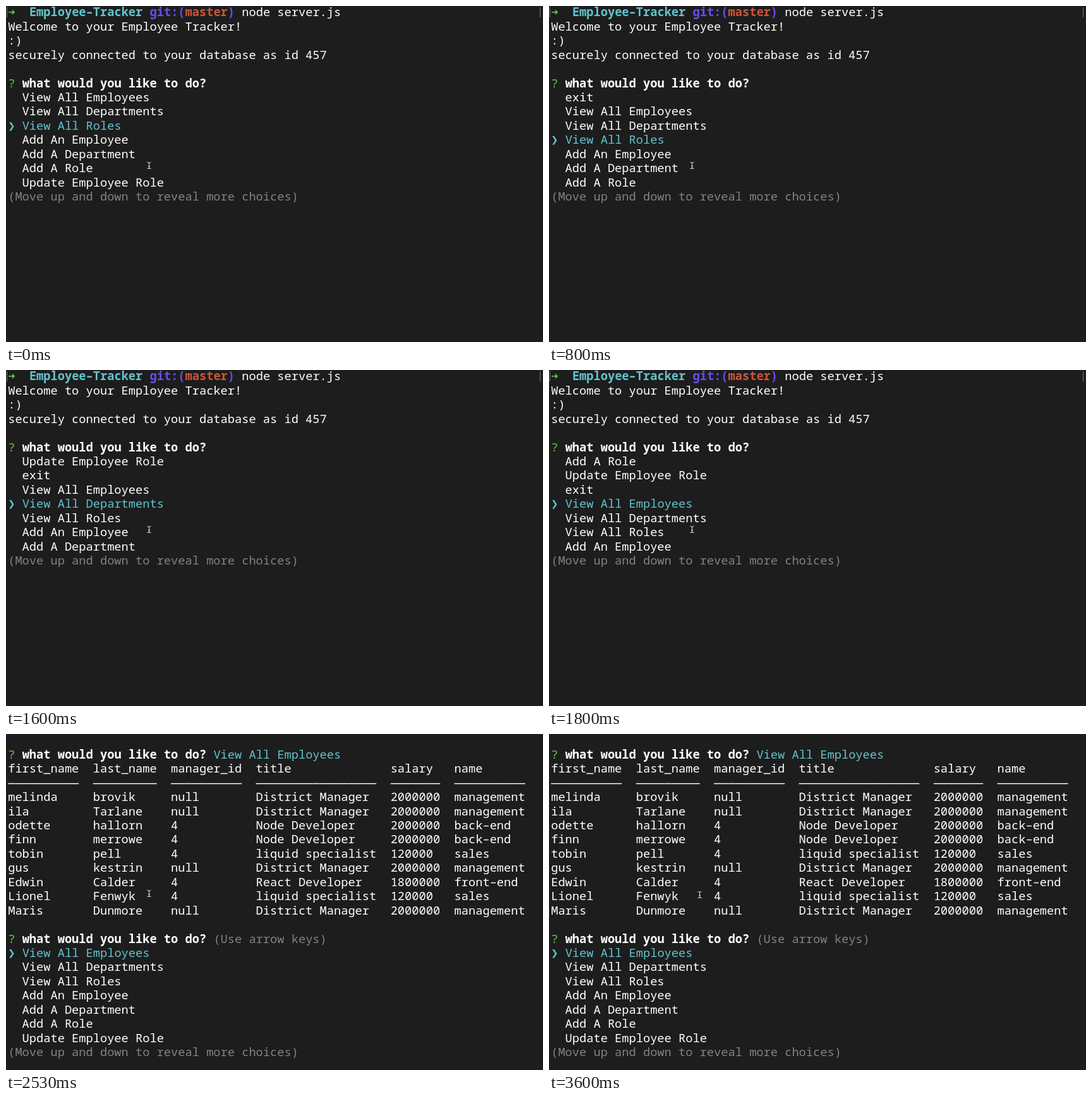
Animation of 850x532 px, one loop 3.66 s. Source, as an HTML page:

```html
<!DOCTYPE html>
<html lang="en">
<head>
<meta charset="utf-8">
<title>Employee Tracker</title>
<style>
  html, body { margin: 0; width: 100%; height: 100%; overflow: hidden; background: #1d1d1d; }
  #term {
    position: absolute; left: 3.2px; top: -1.6px; color: #fff; white-space: pre;
    font: 500 18.7px/22.44px "Noto Sans Mono", "DejaVu Sans Mono", monospace;
    font-variant-ligatures: none;
  }
  #term div { height: 22.44px; }
  b { font-weight: 700; }
  .cyan { color: #62c4cf; }
  .green { color: #68c544; }
  .violet { color: #6a4cf2; }
  .red { color: #cb5538; }
  .gray { color: #828282; }
  .sign { display: inline-block; width: 1ch; line-height: 0; font-family: "DejaVu Sans Mono", monospace; }
  #mark { position: absolute; left: 1px; top: 2px; width: 843px; height: 16px; border: solid #777; border-width: 0 1px; }
  #mouse { position: absolute; left: 0; top: 0; fill: none; stroke: #d4d4d4; stroke-width: 1.1; }
</style>
</head>
<body>
<div id="term"></div>
<div id="mark"></div>
<svg id="mouse" width="10" height="14" viewBox="-5 -7 10 14">
  <path d="M-3-5Q0-5 0-3Q0-5 3-5M0-3V3M-3 5Q0 5 0 3Q0 5 3 5M-1.5 1H1.5"/>
</svg>
<script>
const LOOP = 3660;
const TABLE_AT = 2530;
const term = document.getElementById("term");
const mark = document.getElementById("mark");
const mouse = document.getElementById("mouse");

const choices = ["View All Employees", "View All Departments", "View All Roles", "Add An Employee",
  "Add A Department", "Add A Role", "Update Employee Role", "exit"];

// Key presses: [time, first visible choice, pointer row]
const presses = [[0, 0, 2], [130, 0, 3], [800, 7, 3], [1000, 6, 3], [1730, 5, 3], [TABLE_AT, 0, 0]];

const widths = [12, 11, 12, 19, 9, 10];
const people = `melinda,brovik,null,District Manager,2000000,management
ila,Tarlane,null,District Manager,2000000,management
odette,hallorn,4,Node Developer,2000000,back–end
finn,merrowe,4,Node Developer,2000000,back–end
tobin,pell,4,liquid specialist,120000,sales
gus,kestrin,null,District Manager,2000000,management
Edwin,Calder,4,React Developer,1800000,front–end
Lionel,Fenwyk,4,liquid specialist,120000,sales
Maris,Dunmore,null,District Manager,2000000,management`.split("\n").map(line => line.split(","));

const paint = (style, text) => `<span class="${style}">${text}</span>`;
const ask = (style = "", text = "") =>
  `${paint("green", "?")} <b>what would you like to do?</b> ${paint(style, text)}`;
const tableRow = cells => cells.map((cell, i) => cell.padEnd(widths[i])).join("");

function menu(first, pointer) {
  const rows = Array.from({ length: 7 }, (_, i) => {
    const label = choices[(first + i) % choices.length];
    return i === pointer ? paint("cyan", paint("sign", "❯") + " " + label) : "  " + label;
  });
  return [...rows, paint("gray", "(Move up and down to reveal more choices)")];
}

const intro = [
  paint("green sign", "<b>➜</b>") + "  <b>" + paint("cyan", "Employee–Tracker") + " " +
    paint("violet", "git:(") + paint("red", "master") + paint("violet", ")") + "</b> node server.js",
  "Welcome to your Employee Tracker!",
  ":)",
  "securely connected to your database as id 457",
  "",
  ask()
];

const result = [
  "",
  ask("cyan", choices[0]),
  tableRow(["first_name", "last_name", "manager_id", "title", "salary", "name"]),
  tableRow(widths.map((w, i) => "—".repeat(i < 5 ? w - 2 : w))),
  ...people.map(tableRow),
  "",
  ask("gray", "(Use arrow keys)")
];

let shown;
function draw(now) {
  const t = now % LOOP;
  const state = presses.findLast(press => press[0] <= t);
  if (state !== shown) {
    shown = state;
    const [start, first, pointer] = state;
    const inTable = start >= TABLE_AT;
    const lines = [...(inTable ? result : intro), ...menu(first, pointer)];
    term.innerHTML = lines.map(line => `<div>${line}</div>`).join("");
    mark.style.display = inTable ? "none" : "";
  }
  const p = Math.min(1, Math.max(0, (t - 3000) / 460));
  const ease = p * p * (3 - 2 * p);
  mouse.style.transform = `translate(${221.5 + 12 * ease}px, ${245.5 + 2 * ease}px)`;
  requestAnimationFrame(draw);
}
draw(performance.now());
</script>
</body>
</html>
```
